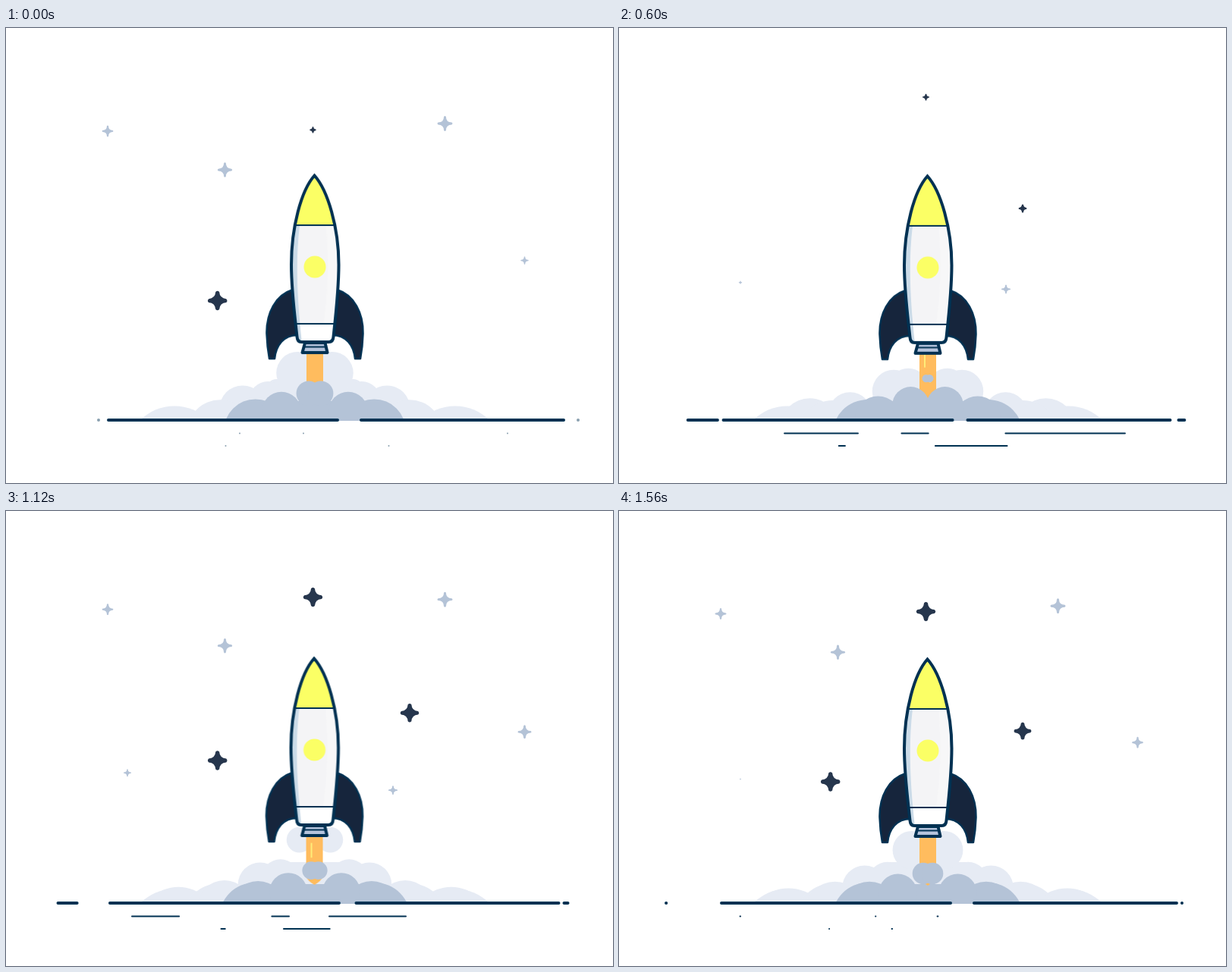
These frames come from a looping animation (800x600 px, 1600 ms). An HTML page:

```html
<!DOCTYPE html>
<html lang="en">
<head>
<meta charset="utf-8">
<title>Rocket launch</title>
<style>
  html, body { margin: 0; width: 100%; height: 100%; overflow: hidden; background: #fff; }
  svg { display: block; width: 100%; height: 100%; }
  .line { fill: none; stroke: #003152; stroke-linecap: round; }
  .edge { stroke: #003152; stroke-linejoin: round; }
  .pale { fill: #e6ebf4; }
  .mid { fill: #b4c3d7; }
  .streak { stroke: #fff27c; stroke-width: 1.8; stroke-linecap: round; }
  .shake { animation: shake 1600ms linear infinite; }
  @keyframes shake {
    0%, 45%, 80%, 100% { transform: none; }
    15% { transform: translate(1px, 1px); }
    27.5% { transform: translate(0, 2px); }
    57.5% { transform: translate(-1px, 0); }
    97.5% { transform: translate(0, 1px); }
  }
</style>
</head>
<body>
<svg viewBox="0 0 800 600">
  <defs>
    <clipPath id="sky"><rect width="800" height="518"/></clipPath>
    <path id="hull" d="M406.5 194.5C389 214 376 263 376 312C376 345 380 375 383.5 407Q384 414 389 414H425.5Q431 414 431.5 407C435 375 438.5 345 438.5 312C438.5 263 424 214 406.5 194.5Z"/>
    <clipPath id="inside"><use href="#hull"/></clipPath>
    <path id="fin" d="M378 345C355 352 343 376 343.5 403Q344 420 347 436H354C356 418 366 405 384 405Z" fill="#16253c" class="edge" stroke-width="2.5"/>
  </defs>

  <g id="stars"></g>

  <g clip-path="url(#sky)">
    <g class="pale">
      <rect x="344" y="463" width="126" height="60" rx="12"/>
      <g id="cloud"></g>
      <use href="#cloud" transform="matrix(-1 0 0 1 814 0)"/>
    </g>
    <rect class="mid" x="345" y="492" width="124" height="30"/>
    <g class="shake">
      <path d="M396 428H418V482Q416 488 407 493Q398 488 396 482Z" fill="#ffbc5e"/>
      <g id="streaks"></g>
    </g>
    <g class="mid">
      <g id="dust"></g>
      <use href="#dust" transform="matrix(-1 0 0 1 814 0)"/>
    </g>
  </g>

  <g class="shake">
    <use href="#fin"/>
    <use href="#fin" transform="matrix(-1 0 0 1 814 0)"/>
    <path d="M394 415H420.5L423.5 428H390.5Z" fill="#b4c3dc" class="edge" stroke-width="4"/>
    <path d="M392 420.5H422" class="line" stroke-width="2"/>
    <g clip-path="url(#inside)">
      <rect x="370" y="190" width="75" height="70" fill="#fbff65"/>
      <rect x="370" y="260" width="75" height="130" fill="#f4f4f6"/>
      <path d="M421 260C425 300 424 350 418 390H445V260Z" fill="#f7f7f8"/>
      <rect x="370" y="390" width="75" height="26" fill="#fff"/>
      <path d="M387 260C381 310 384 360 390 416H370V260Z" fill="#cbdbe8"/>
      <path d="M370 260H445M370 390H445" class="line" stroke-width="2"/>
    </g>
    <use href="#hull" fill="none" stroke="#003152" stroke-width="4"/>
    <circle cx="407" cy="315" r="14.5" fill="#fbff65"/>
  </g>

  <g id="ground"></g>
</svg>
<script>
const LOOP = 1600, LIFE = 1070, PUFF = 400, AXIS = 407;
const $ = id => document.getElementById(id);
const clamp = u => Math.max(0, Math.min(1, u));
const mix = ([a, b], u) => a + (b - a) * u;
const cubic = u => u < .5 ? 4 * u ** 3 : 1 - 4 * (1 - u) ** 3;
const sine = u => (1 - Math.cos(Math.PI * u)) / 2;
const easeOut = u => 1 - (1 - u) ** 1.4;

function set(el, attrs) {
  for (const k in attrs) el.setAttribute(k, attrs[k]);
}
function add(id, tag, attrs = {}) {
  const el = document.createElementNS('http://www.w3.org/2000/svg', tag);
  set(el, attrs);
  $(id).append(el);
  return el;
}

// Four rounded points with a curved waist between them.
function starPath(tip, waist) {
  let d = `M${tip}-.9`;
  for (let i = 0, x = 1, y = -1; i < 4; i++, [x, y] = [-y, x]) {
    const end = i % 2 ? [tip * x, .9 * y] : [.9 * x, tip * y];
    const next = i % 2 ? [-tip * x, .9 * y] : [.9 * x, -tip * y];
    const point = i % 2 ? [0, 1.1 * y] : [1.1 * x, 0];
    d += `Q${waist * x} ${waist * y} ${end}Q${point} ${next}`;
  }
  return d + 'Z';
}

// A star grows, drifts down and shrinks; y is its height at the end of the loop.
function star(x, y, r, drift, birth, dark) {
  const el = add('stars', 'path', dark
    ? { d: starPath(.19, .24), fill: '#26364d' }
    : { d: starPath(.14, .15), fill: '#b4c3d7' });
  return t => {
    const age = (t - birth + LOOP) % LOOP;
    const k = r * clamp(age / 160) * clamp((LIFE - age) / (dark ? 42 : 160));
    set(el, { transform: `translate(${x} ${y + drift * ((age + birth) / LOOP - 1)}) scale(${k})` });
  };
}

// A new puff leaves the axis every PUFF ms, spreads, sinks and settles as a mound.
function puffs(id, { birth, span, bend, grow, spread, top, size }) {
  const dots = [3, 2, 1, 0].map(n => [add(id, 'circle'), n]);
  return t => dots.forEach(([el, n]) => {
    const u = clamp((t % PUFF + n * PUFF - birth) / span);
    const r = size[0] * clamp(u / grow) + (size[1] - size[0]) * u ** 5;
    set(el, { cx: AXIS - mix(spread, sine(u ** bend)), cy: mix(top, easeOut(u)) + r, r });
  });
}

// A light streak sliding slowly down the flame.
function streak(x, birth, y, length) {
  const el = add('streaks', 'path', { class: 'streak' });
  return t => {
    const on = t > birth && t < 1420;
    set(el, { d: `M${x} ${y + .02 * (t - birth)}v${length}`, opacity: +on });
  };
}

const sway = (t, amount) => amount * sine(t / LOOP * 2);

function bar(from, to, amount) {
  const el = add('ground', 'path', { class: 'line', 'stroke-width': 4, d: `M${from} 517H${to}` });
  return t => set(el, { transform: `translate(${sway(t, amount)})` });
}

// A dash whose front leaves first and whose back catches up.
function dash(y, from, to, amount = 10) {
  const el = add('ground', 'path', { class: 'line', 'stroke-width': y === 517 ? 4 : 2 });
  return t => {
    const x = u => mix([from, to], u) + sway(t, amount);
    const front = x(cubic(clamp(t / LIFE)));
    const back = x(sine(clamp((t - LOOP + LIFE) / LIFE)));
    set(el, { d: `M${front} ${y}H${back + .01}`, opacity: clamp(.45 + t / 80) });
  };
}

const parts = [
  star(134, 136, 7.5, 21, 813),
  star(578.5, 126, 10, 31, 816),
  star(288.5, 187, 9.7, 31, 740),
  star(683.5, 306.5, 9, 51, 625),
  star(510, 390, 6, 73, 400),
  star(160, 354.3, 5, 30, 530),
  star(404.5, 134.3, 12.7, 69, 545, true),
  star(278.7, 359.5, 12.8, 102, 740, true),
  star(532, 292.3, 12.3, 87, 530, true),

  puffs('cloud', { birth: 240, span: 960, bend: 1.4, grow: .14, spread: [20, 185], top: [406, 498.5], size: [28, 64] }),
  puffs('cloud', { birth: 440, span: 800, bend: 1, grow: .2, spread: [15, 125], top: [433, 491], size: [25, 50] }),
  puffs('dust', { birth: 110, span: 1150, bend: 1.25, grow: .37, spread: [2, 79], top: [453, 490], size: [24, 47] }),

  streak(403, 600, 428, 18),
  streak(410, 160, 452, 5),

  bar(135, 437, 3),
  bar(468, 735, -10),
  dash(517, 122, 62),
  dash(517, 754, 742, -10),
  dash(534.5, 308, 159.5),
  dash(534.5, 392, 338, 19),
  dash(534.5, 661, 419.5),
  dash(551, 289.5, 277),
  dash(551, 504.5, 359.5)
];

const start = performance.now();
function draw() {
  const t = (performance.now() - start) % LOOP;
  parts.forEach(part => part(t));
  requestAnimationFrame(draw);
}
draw();
</script>
</body>
</html>
```
